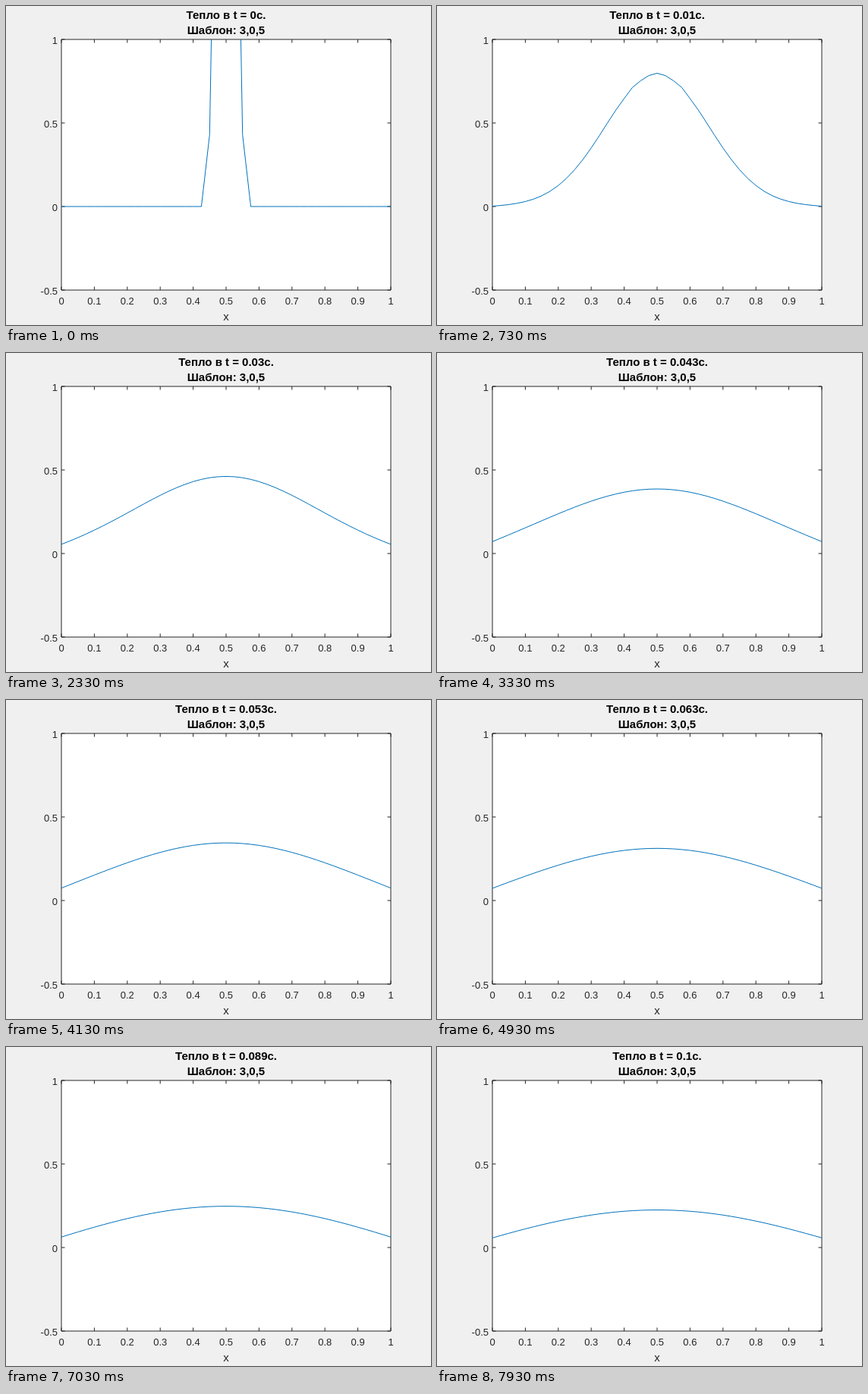
An HTML page that plays this animation: 560 px wide and 420 px high, repeating every 8 s.

```html
<!DOCTYPE html>
<html lang="ru">
<head>
<meta charset="utf-8">
<title>Тепло</title>
<style>
  html, body { margin: 0; width: 100%; height: 100%; overflow: hidden; background: #f0f0f0; }
  svg { display: block; width: 560px; height: 420px; }
  text { font-family: "Liberation Sans", Arial, sans-serif; font-size: 13px; fill: #262626; }
  .title { font-size: 15px; font-weight: bold; fill: #000; text-anchor: middle; }
  .mid { text-anchor: middle; }
  .end { text-anchor: end; }
  .axis { fill: none; stroke: #262626; stroke-width: 1; }
  #curve { fill: none; stroke: #0072bd; stroke-width: 1; stroke-linejoin: round; }
</style>
</head>
<body>
<svg id="stage" viewBox="0 0 560 420">
  <clipPath id="clip"><rect x="72" y="44" width="436" height="330"/></clipPath>
  <rect width="560" height="420" fill="#f0f0f0"/>
  <rect x="73" y="44" width="434" height="330" fill="#fff"/>
  <g id="axes"></g>
  <g clip-path="url(#clip)"><polyline id="curve"/></g>
  <text id="time" class="title" x="290" y="17"></text>
  <text class="title" x="290" y="37">Шаблон: 3,0,5</text>
  <text class="mid" x="290" y="414" style="font-size:15px">x</text>
</svg>
<script>
const LOOP = 8000, FIRST = 30, STEP = 100, LAST = 80;
const N = 40, H = 1 / N, DT = 0.00125;
const DIFF = 1.2, LOSS = 10.5;           // conductivity, heat loss at the ends
const R = DIFF * DT / (H * H) / 2;

const px = x => 73 + 434 * x;
const py = u => 264 - 220 * u;
const $ = id => document.getElementById(id);

function add(tag, attrs, text) {
  const el = document.createElementNS("http://www.w3.org/2000/svg", tag);
  for (const key in attrs) el.setAttribute(key, attrs[key]);
  if (text !== undefined) el.textContent = text;
  $("axes").appendChild(el);
}

function drawAxes() {
  let d = "M73 44H507V374H73Z";
  for (let i = 0; i <= 10; i++) {
    const x = px(i / 10);
    d += `M${x} 374v-4.5M${x} 44v4.5`;
    add("text", { class: "mid", x, y: 393 }, i / 10);
  }
  for (const u of [-0.5, 0, 0.5, 1]) {
    d += `M73 ${py(u)}h4.5M507 ${py(u)}h-4.5`;
    add("text", { class: "end", x: 68, y: py(u) + 6 }, u);
  }
  add("path", { class: "axis", d });
}

// End value from the slope rule, taken on the previous layer
const edge = (a, b) => (4 * a - b) / (3 + 2 * H * LOSS);

// Crank-Nicolson step
function advance(u) {
  const out = [], c = [0], d = [edge(u[1], u[2])];
  out[N] = edge(u[N - 1], u[N - 2]);
  for (let i = 1; i < N; i++) {
    const rhs = u[i] + R * (u[i - 1] - 2 * u[i] + u[i + 1]);
    const m = 1 + 2 * R + R * c[i - 1];
    c[i] = -R / m;
    d[i] = (rhs + R * d[i - 1]) / m;
  }
  for (let i = N - 1; i >= 0; i--) out[i] = d[i] - c[i] * out[i + 1];
  return out;
}

function solve() {
  const hot = [5.2, 3.2, 0.43];
  let u = Array.from({ length: N + 1 }, (_, i) => hot[Math.abs(i - N / 2)] || 0);
  const all = [u];
  while (all.length <= LAST) all.push(u = advance(u));
  return all;
}

const lines = solve().map(u =>
  u.map((v, i) => px(i * H).toFixed(2) + "," + py(v).toFixed(2)).join(" "));
let shown = -1;

function show(ms) {
  const k = ms < FIRST ? 0 : Math.min(LAST, Math.floor((ms - FIRST) / STEP) + 1);
  if (k === shown) return;
  shown = k;
  $("curve").setAttribute("points", lines[k]);
  $("time").textContent = `Тепло в t = ${Math.round(k * 1.25) / 1000}с.`;
}

drawAxes();
show(0);
const start = performance.now();
function tick() {
  show((performance.now() - start) % LOOP);
  requestAnimationFrame(tick);
}
requestAnimationFrame(tick);
</script>
</body>
</html>
```
